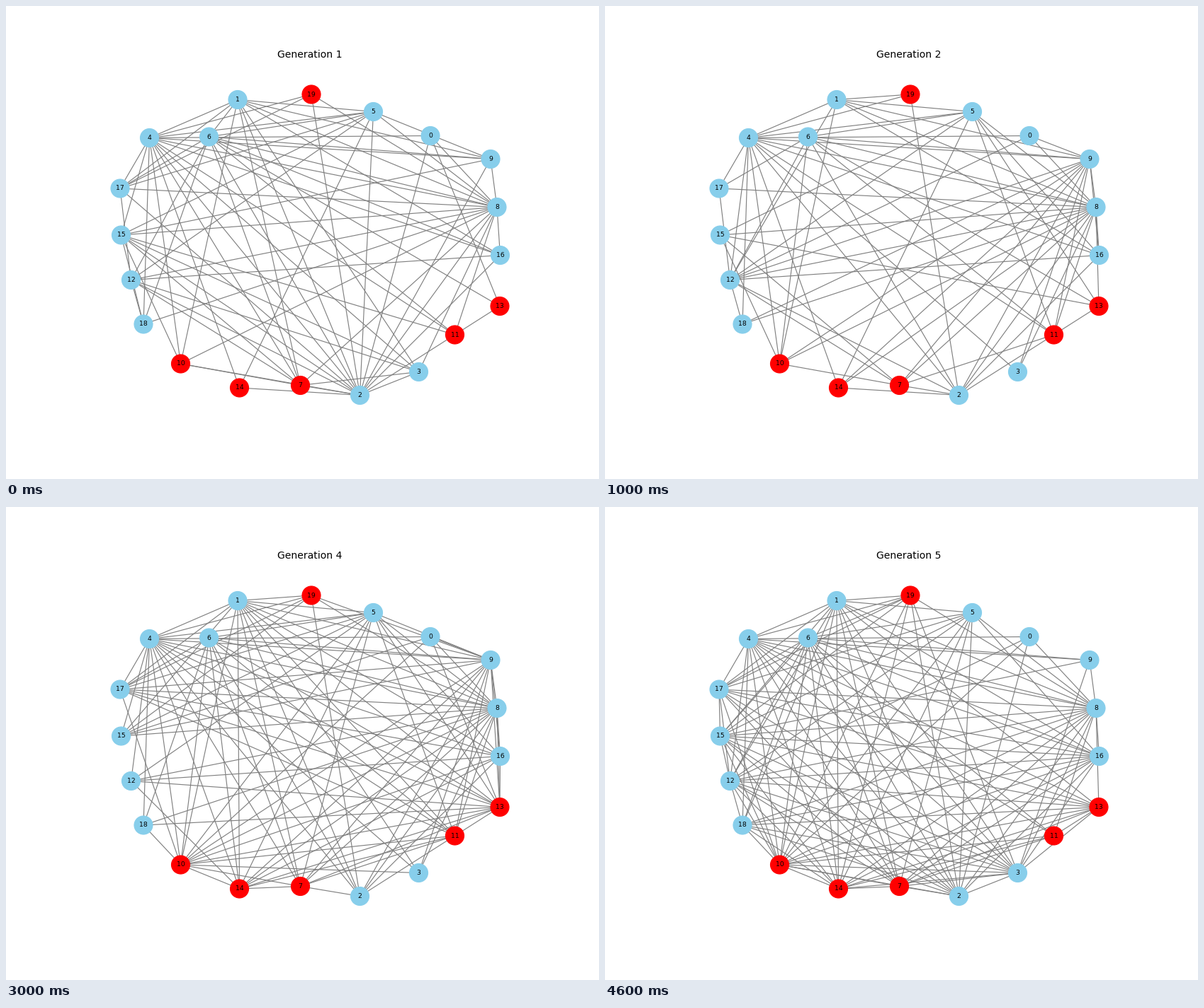
A matplotlib script that plays this animation: 837 px wide and 669 px high, repeating every 5000 ms.

```python
import matplotlib.pyplot as plt
from matplotlib.animation import FuncAnimation
from matplotlib.collections import LineCollection

W, H, DPI = 837, 669, 64
PT = 72 / DPI      # points per pixel
SCALE = 0.837      # stage size relative to a 1000 px wide figure

NODES = [
    (599, 183.5), (327, 132.5), (499.5, 550.5), (582.5, 517.5), (202.5, 186.5),
    (518.5, 149.5), (286.5, 185), (415.5, 536.5), (693, 284.5), (684, 216.5),
    (246.5, 506), (633.5, 465), (176.5, 387.5), (697, 424.5), (329.5, 540),
    (162.5, 324), (697.5, 352.5), (161, 258), (194, 450), (431, 125),
]
RED = {7, 10, 11, 13, 14, 19}
ALL = "12345"

# node -> {generations in which the links live: neighbours}
LINKS = {
    0: {ALL: [4, 8], "234": [9], "15": [2], "134": [13], "235": [12],
        "345": [10], "3": [16], "4": [15]},
    1: {ALL: [8, 16], "1245": [4, 5, 10], "145": [2, 3, 7], "1234": [9],
        "1": [6], "235": [12], "45": [13, 15], "345": [14], "1345": [17],
        "4": [11], "5": [18], "2345": [19]},
    2: {ALL: [4, 7, 8, 16, 19], "135": [3], "1245": [6], "124": [9, 11],
        "1235": [12], "123": [14], "15": [5, 10, 15, 17], "5": [18]},
    3: {ALL: [8], "1245": [4], "15": [7], "245": [9], "45": [10],
        "135": [12, 15], "5": [6, 13, 14, 16, 17, 18, 19]},
    4: {ALL: [9, 10, 17, 19], "124": [5], "145": [7],
        "1245": [8, 11, 14, 16, 18], "245": [12], "45": [13], "14": [15]},
    5: {ALL: [6, 8, 15], "345": [7, 10], "134": [9], "234": [11, 13],
        "12345": [6, 8, 12, 15], "1245": [14], "2345": [16],
        "1345": [17], "3": [18]},
    6: {ALL: [8, 9, 11, 17], "1345": [7, 18], "2345": [10], "1235": [12],
        "1234": [13], "345": [14], "5": [15], "135": [16], "35": [19]},
    7: {ALL: [8, 10], "24": [9], "2345": [11], "1235": [12, 15],
        "345": [13, 14], "5": [16, 17]},
    8: {ALL: [9, 10, 11, 12, 15, 16, 17, 18], "2345": [13, 14],
        "1345": [19]},
    9: {"234": [10, 14, 16], "24": [11], "23": [12, 18], "34": [13, 17],
        "1345": [15], "4": [19]},
    10: {"345": [11, 13, 14, 16, 17, 18], "35": [12], "1235": [15],
         "5": [19]},
    11: {ALL: [13], "3": [12], "345": [14], "13": [15], "4": [17]},
    12: {ALL: [16], "345": [13], "45": [14], "5": [15], "1235": [17, 18]},
    13: {"345": [14, 17, 18], "25": [15], "34": [16]},
    14: {"45": [16], "35": [18], "5": [15, 19]},
    15: {"5": [16, 17], "13": [18], "45": [19]},
    16: {"345": [17], "35": [18]},
    17: {"3": [18], "1345": [19]},
}


def segments(gen):
    """Line ends of every link alive in a generation."""
    return [(NODES[a], NODES[b])
            for a, spans in LINKS.items()
            for span, ends in spans.items() if str(gen) in span
            for b in ends]


fig = plt.figure(figsize=(W / DPI, H / DPI), dpi=DPI, facecolor="white")
ax = fig.add_axes([0, 0, 1, 1])
ax.set(xlim=(0, W), ylim=(H, 0))
ax.axis("off")

line_width = 100 / 72 * SCALE * PT
edges = LineCollection([], colors="gray", linewidths=line_width, zorder=1)
ax.add_collection(edges)

xs, ys = zip(*NODES)
fills = ["red" if n in RED else "skyblue" for n in range(len(NODES))]
ax.scatter(xs, ys, s=500 * line_width ** 2, c=fills,
           linewidths=line_width, zorder=2)
for n, (x, y) in enumerate(NODES):
    ax.text(x, y, str(n), size=8 * line_width, family="DejaVu Sans",
            ha="center", va="center", zorder=3)

title = ax.text(W * 0.5125, 73.3, "", size=12 * line_width,
                family="DejaVu Sans", ha="center", va="baseline")


def update(i):
    edges.set_segments(segments(i + 1))
    title.set_text(f"Generation {i + 1}")
    return edges, title


anim = FuncAnimation(fig, update, frames=5, interval=1000, repeat=True)
plt.show()
```
